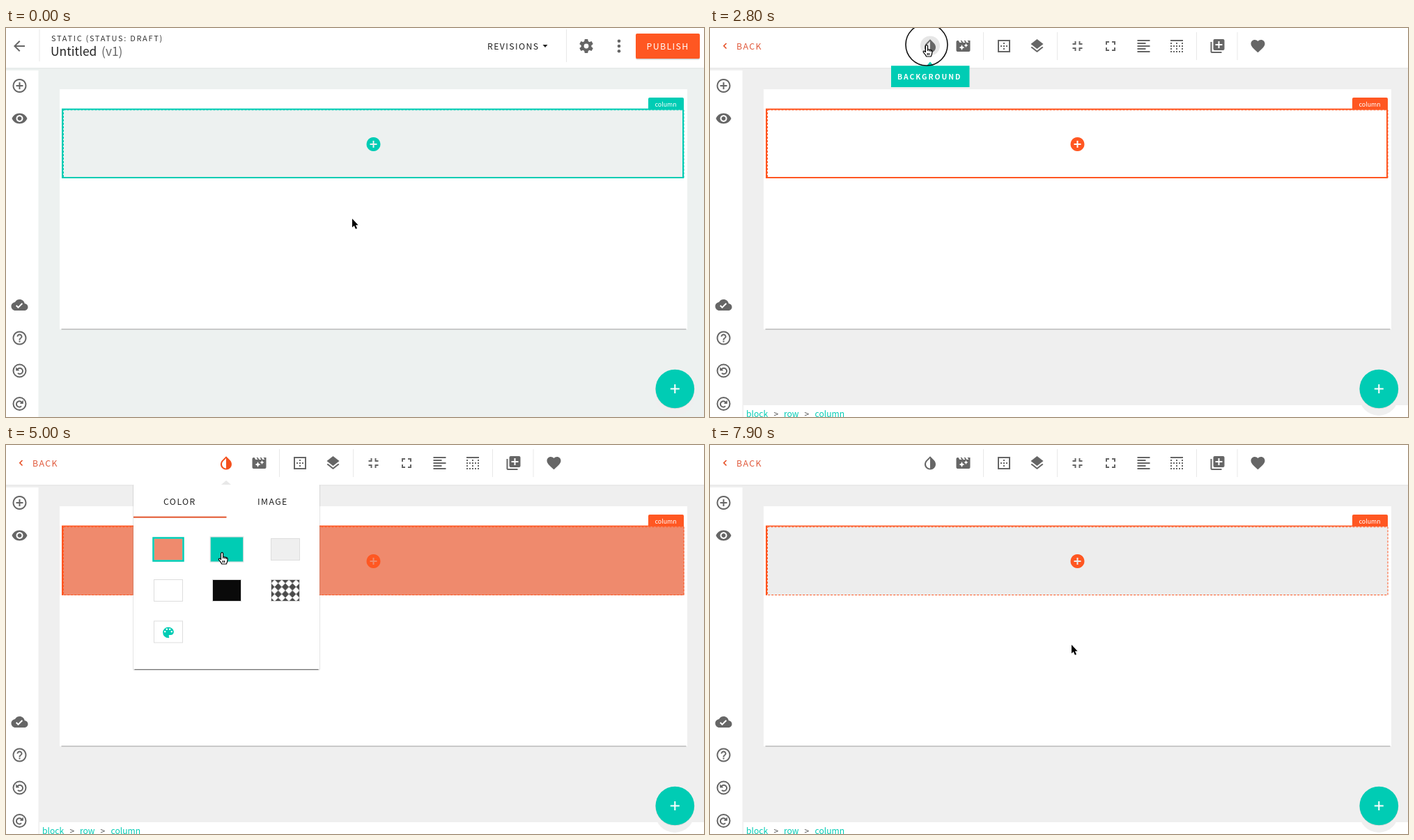
An HTML page for the animation above (8 s loop, 1002 px wide and 559 px high).

```html
<!DOCTYPE html>
<html lang="en">
<head>
<meta charset="utf-8">
<title>Column background editor</title>
<style>
  html, body { margin: 0; width: 100%; height: 100%; overflow: hidden; background: #fff; }
  svg { display: block; width: 100vw; height: 100vh; }
  text { font-family: "Noto Sans CJK JP", "Noto Sans CJK SC", "Noto Sans CJK", "Noto Sans", sans-serif; white-space: pre; }
  .caps { font-size: 12.3px; letter-spacing: 1.4px; fill: #222; }
  .icon { fill: #666; }
  .line { fill: none; stroke: #666; stroke-width: 2; }
  .rule { stroke: #e8e8e8; }
  .accent { fill: var(--accent); }
  .edge { fill: none; stroke: var(--accent); }
  .crumb { font-size: 12.1px; fill: #00ccb4; }
</style>
</head>
<body>
<svg id="stage" viewBox="0 0 1002 559"></svg>
<script>
const TEAL = '#00ccb4', ORANGE = '#ff5722', LOOP = 8000, STEP = 100;

const RING = 'M12 2a10 10 0 1 0 .01 0zM12 4a8 8 0 1 1-.01 0z';
const ICONS = {
  back: 'M20 11H7.83l5.59-5.59L12 4l-8 8 8 8 1.41-1.41L7.83 13H20z',
  add: RING + 'M13 7h-2v4H7v2h4v4h2v-4h4v-2h-4z',
  plusDisc: 'M12 2a10 10 0 1 0 .01 0zM13 7h-2v4H7v2h4v4h2v-4h4v-2h-4z',
  eye: 'M12 4.5C7 4.5 2.73 7.61 1 12c1.73 4.39 6 7.5 11 7.5s9.27-3.11 11-7.5c-1.73-4.39-6-7.5-11-7.5zM12 17a5 5 0 1 1 .01 0zM12 9a3 3 0 1 0 .01 0z',
  cloud: 'M19.35 10.04C18.67 6.59 15.64 4 12 4 9.11 4 6.6 5.64 5.35 8.04 2.34 8.36 0 10.91 0 14c0 3.31 2.69 6 6 6h13c2.76 0 5-2.24 5-5 0-2.64-2.05-4.78-4.65-4.96zM10 17l-3.5-3.5 1.41-1.41L10 14.17 15.18 9l1.41 1.41z',
  help: RING + 'M11 18h2v-2h-2zM12 6c-2.21 0-4 1.79-4 4h2c0-1.1.9-2 2-2s2 .9 2 2c0 2-3 1.75-3 5h2c0-2.25 3-2.5 3-5 0-2.21-1.79-4-4-4z',
  drop: 'M17.66 7.93L12 2.27 6.34 7.93c-3.12 3.12-3.12 8.19 0 11.31a8 8 0 0 0 11.32 0c3.12-3.12 3.12-8.19 0-11.31zM12 19.59c-1.6 0-3.11-.62-4.24-1.76a6 6 0 0 1 0-8.48L12 5.1z',
  movie: 'M18 4l2 3h-3l-2-3h-2l2 3h-3l-2-3H8l2 3H7L5 4H4c-1.1 0-2 .9-2 2v12c0 1.1.9 2 2 2h16c1.1 0 2-.9 2-2V4zM11.25 15.25L10 18l-1.25-2.75L6 14l2.75-1.25L10 10l1.25 2.75L14 14zM16.94 11.94L16 14l-.94-2.06L13 11l2.06-.94L16 8l.94 2.06L19 11z',
  border: 'M3 3v18h18V3zM19 19H5V5h14zM11 7h2v2h-2zM11 11h2v2h-2zM11 15h2v2h-2zM7 11h2v2H7zM15 11h2v2h-2z',
  layers: 'M12 18.54l-7.38-5.73L3 14.07l9 7 9-7-1.63-1.27zM12 16l7.36-5.73L21 9l-9-7-9 7 1.63 1.27z',
  shrink: 'M5 16h3v3h2v-5H5zM8 8H5v2h5V5H8zM14 19h2v-3h3v-2h-5zM16 8V5h-2v5h5V8z',
  expand: 'M7 14H5v5h5v-2H7zM5 10h2V7h3V5H5zM17 17h-3v2h5v-5h-2zM14 5v2h3v3h2V5z',
  align: 'M3 3h18v2H3zM3 7h12v2H3zM3 11h18v2H3zM3 15h12v2H3zM3 19h18v2H3z',
  copy: 'M4 6H2v14c0 1.1.9 2 2 2h14v-2H4zM20 2H8c-1.1 0-2 .9-2 2v12c0 1.1.9 2 2 2h12c1.1 0 2-.9 2-2V4c0-1.1-.9-2-2-2zM19 11h-4v4h-2v-4H9V9h4V5h2v4h4z',
  heart: 'M12 21.35l-1.45-1.32C5.4 15.36 2 12.28 2 8.5 2 5.42 4.42 3 7.5 3c1.74 0 3.41.81 4.5 2.09C13.09 3.81 14.76 3 16.5 3 19.58 3 22 5.42 22 8.5c0 3.78-3.4 6.86-8.55 11.54z',
  palette: 'M12 3a9 9 0 0 0 0 18c.83 0 1.5-.67 1.5-1.5 0-.39-.15-.74-.39-1.01-.23-.26-.38-.61-.38-.99 0-.83.67-1.5 1.5-1.5H16c2.76 0 5-2.24 5-5 0-4.42-4.03-8-9-8z'
    + [[6.5, 9], [9.5, 5], [14.5, 5], [17.5, 9]].map(([x, y]) => `M${x} ${y}a1.5 1.5 0 1 1-.01 0z`).join('')
};

const icon = (name, x, y, attrs = 'class="icon"', scale = 1) =>
  `<path ${attrs} fill-rule="evenodd" transform="translate(${x} ${y}) scale(${scale}) translate(-12 -12)" d="${ICONS[name]}"/>`;
const text = (x, y, str, attrs = 'class="caps"') => `<text x="${x}" y="${y}" ${attrs}>${str}</text>`;
const rect = (x, y, w, h, attrs) => `<rect x="${x}" y="${y}" width="${w}" height="${h}" ${attrs}/>`;
const rule = (x, y1, y2) => `<path class="rule" d="M${x} ${y1}V${y2}"/>`;

const turnArrow = (y, flip) => `<g transform="translate(19.5 ${y}) scale(${flip} 1)">
  <circle class="line" r="9"/>
  <path class="line" stroke-width="1.6" d="M-3.5-1.2A4.2 4.2 0 1 1-2.6 3.4"/>
  <path class="icon" d="M-5.3-5.2V0H-.2z"/></g>`;

const gear = `<g transform="translate(833 26)">
  <circle r="5.4" fill="none" stroke="#666" stroke-width="4"/>
  ${[0, 1, 2, 3, 4, 5].map(i => `<path class="icon" transform="rotate(${i * 60})" d="M-3-6L-2.2-10H2.2L3-6z"/>`).join('')}</g>`;

const sidebar = rect(0, 61, 46.5, 498, 'fill="#fff"')
  + icon('add', 19.5, 83) + icon('eye', 19.5, 130) + icon('cloud', 19.5, 398) + icon('help', 19.5, 445.5)
  + turnArrow(492.5, 1) + turnArrow(540, -1);

const pageHeader = `<g id="pageHeader">
  ${icon('back', 19, 26)}${rule(48, 2, 48)}${rule(804.5, 2, 49)}
  ${text(65, 19, 'STATIC (STATUS: DRAFT)', 'font-size="11" letter-spacing="1.68" fill="#333"')}
  ${text(64, 40, 'Untitled', 'font-size="17.4" fill="#222"')}
  ${text(137, 40, '(v1)', 'font-size="17.4" fill="#666"')}
  ${text(691, 31, 'REVISIONS')}
  <path d="M770.5 24H777.5L774 28z" fill="#222"/>
  ${gear}
  ${[18.7, 26, 33.3].map(y => `<circle class="icon" cx="880" cy="${y}" r="2.3"/>`).join('')}
  ${rect(904, 9.5, 92, 36, 'rx="2" fill="#000" opacity=".18"')}
  ${rect(904, 8, 92, 36, `rx="2" fill="${ORANGE}"`)}
  ${text(919.5, 31, 'PUBLISH', 'class="caps" style="fill:#fff"')}</g>`;

const toolbar = `<g id="toolbar">
  <path d="M23.5 22L19.8 25.8 23.5 29.6" fill="none" stroke="#e64a1f" stroke-width="1.5"/>
  ${text(38, 31, 'BACK', 'class="caps" style="fill:#e0583a"')}
  <circle id="dropHover" cx="316" cy="25.5" r="14" fill="#e6e6e6"/>
  ${icon('drop', 316, 26, 'id="drop"')}${icon('movie', 363.5, 26)}${rule(392.5, 6, 46)}
  ${icon('border', 422, 26)}${icon('layers', 469.5, 26)}${rule(498.5, 6, 46)}
  ${icon('shrink', 527.5, 26)}${icon('expand', 575, 26)}${icon('align', 622.5, 26)}
  <g transform="translate(658 14)" class="line"><path d="M3 4H21"/>
    <path stroke-dasharray="2 2" d="M3 12H21M3 20H21"/><path stroke-dasharray="2 6" d="M3 8H21M3 16H21"/></g>
  ${rule(698.5, 6, 46)}${icon('copy', 728.5, 26)}${rule(757, 6, 46)}${icon('heart', 786.5, 26)}
  ${rect(48, 542, 954, 17, 'fill="#fff"')}
  ${text(52, 559, 'block', 'class="crumb"')}${text(106, 559, 'row', 'class="crumb"')}${text(150.5, 559, 'column', 'class="crumb"')}
  ${[91.5, 135.5].map(x => text(x, 559, '&gt;', 'font-size="12.1" fill="#555"')).join('')}</g>`;

const page = rect(77, 88, 901, 345, 'fill="#fff"')
  + rect(79.5, 432.2, 897, 1.3, 'fill="#b2b2b2"')
  + `<g id="column">
  ${rect(81, 116.7, 891, 98.3, 'class="edge" stroke-width="2" id="under"')}
  ${rect(82, 117.3, 891.5, 98.7, 'id="fill"')}
  ${rect(82.5, 117.8, 890.5, 97.7, 'class="edge" stroke-dasharray="3 2"')}
  ${rect(81, 116.7, 891, 98.3, 'class="edge" stroke-width="2" id="over"')}
  <path class="accent" d="M922 117V102q0-2 2-2H971q2 0 2 2V117z"/>
  ${text(931.5, 112.7, 'column', 'font-size="8.9" fill="#fff"')}
  ${icon('plusDisc', 527.5, 167, 'class="accent"')}</g>`;

const fab = `<circle cx="960" cy="529" r="28" fill="#efefef"/>
  <circle cx="960.3" cy="519.3" r="28" fill="#000" opacity=".1"/>
  <circle cx="960.3" cy="518.5" r="27.8" fill="${TEAL}"/>
  <path d="M953.8 518.5H966.8M960.3 512V525" stroke="#fff" stroke-width="2"/>`;

const swatches = [
  [233, 150, '#ef8a6d'], [317, 150, TEAL], [401, 150, '#efefef'],
  [233, 209, '#fff'], [317, 209, '#0a0a0a'], [401, 209, 'url(#checker)'], [233, 268.5, '#fff']
];
const swatch = ([x, y, fill], i) => `<g id="swatch${i}" transform="translate(${x} ${y})">
  <g class="zoom">${rect(-20.5, -15.5, 41, 31, `fill="${fill}" stroke="#ddd"`)}</g>
  ${rect(-21.5, -16.5, 43, 33, `class="chosen" fill="none" stroke="${TEAL}" stroke-width="2.5"`)}</g>`;

const panel = `<g id="panel">
  <path d="M309 57L316 51 323 57z" fill="#e8e8e8"/>
  ${rect(182, 57, 269, 267, 'rx="2" fill="#000" opacity=".1"')}
  ${rect(184.5, 58, 264, 265.2, 'fill="#777"')}
  ${rect(183, 57, 267, 265, 'rx="1" fill="#fff"')}
  ${text(226, 86, 'COLOR')}${text(361, 86, 'IMAGE')}
  ${rect(183, 102.7, 133.5, 2, 'fill="#e2552d"')}
  ${swatches.map(swatch).join('')}
  ${icon('palette', 233, 269.5, `fill="${TEAL}"`, .87)}</g>`;

const tooltip = `<g id="tooltip">
  <path d="M260 54.3H311L316 48.5 321 54.3H372.5V85H260z" fill="${TEAL}"/>
  ${text(269, 74, 'BACKGROUND', 'font-size="10.4" font-weight="700" letter-spacing="1.95" fill="#fff"')}</g>`;

const pointer = `<g id="pointer">
  <circle id="click" r="30" cy="-.5" fill="none" stroke="#111" stroke-width="1.6"/>
  <path id="arrow" d="M0 0V12.6L2.8 10 4.9 14.8 7 13.9 5 9.2H8.6z" fill="#000" stroke="#fff" stroke-width="1.4" paint-order="stroke"/>
  <g id="hand" stroke="#000" stroke-width="1.2" stroke-linejoin="round">
    <path fill="#fff" d="M-1.6 1.2Q0-1.4 1.5 1.2V6L6 7Q8.2 7.5 8 10 7.8 13 6.2 16.5H-.4Q-1.6 13.6-4.6 10.6-5.4 8.5-3.5 8.5L-1.6 10z"/>
    <path fill="none" d="M1.5 5.6V8.6M3.8 6.5V9M6 7V9.4M1.2 11.6V14.4M3.4 11.6V14.4"/></g></g>`;

document.getElementById('stage').innerHTML = `
  <defs><pattern id="checker" x="-20.5" y="-15.5" width="10.25" height="10.4" patternUnits="userSpaceOnUse">
    <rect width="11" height="11" fill="#4a4a4a"/><path d="M5.1 0L10.2 5.2 5.1 10.4 0 5.2z" fill="#fff"/></pattern></defs>
  ${rect(0, 0, 1002, 559, 'id="backdrop"')}
  ${rect(0, 57, 1002, 2, 'fill="#000" opacity=".02"')}
  ${rect(0, 0, 1002, 57, 'fill="#fff"')}
  ${page}${pageHeader}${toolbar}${sidebar}${fab}${panel}${tooltip}${pointer}`;

// Pointer path: time, x, y
const path = [
  [0, 497, 274], [900, 937, 125], [1100, 937, 121], [1400, 936, 111], [2000, 936, 111],
  [2600, 311, 24.5], [3200, 311, 24.5], [4000, 234, 159], [4600, 234, 159],
  [5100, 319, 154], [5500, 319, 154], [5700, 368, 155], [6100, 402, 153], [6800, 402, 153],
  [7300, 519, 287], [LOOP, 519, 287]
];
const clicks = [[1600, 1900], [2700, 3000], [4200, 4500], [5200, 5500], [6200, 6500], [7400, 7600]];
const handTimes = [[1300, 2200], [2500, 3300], [3900, 4800], [5000, 5600], [5900, 6900]];
const hovers = [[0, 3800, 4900], [1, 4900, 5850], [2, 5800, 7000]];
// Selected swatch and resulting column fill, from each time on
const choices = [[0, 5, 'none'], [4400, 0, '#ef8a6d'], [5300, 1, TEAL], [6400, 2, '#ededed']];

const $ = id => document.getElementById(id);
const show = (el, on) => { el.style.display = on ? '' : 'none'; };
const during = (ranges, t) => ranges.some(([a, b]) => t >= a && t < b);
const clamp = v => Math.max(0, Math.min(1, v));
const ease = v => v * v * (3 - 2 * v);

function pointerAt(t) {
  const i = path.findIndex(p => p[0] > t);
  const [t0, x0, y0] = path[i - 1], [t1, x1, y1] = path[i];
  const k = ease((t - t0) / (t1 - t0));
  return [x0 + (x1 - x0) * k, y0 + (y1 - y0) * k];
}

function draw(t) {
  const selected = t >= 1900, open = t >= 3000 && t < 7600;
  const [x, y] = pointerAt(t);
  const [, chosen, paint] = choices.filter(c => c[0] <= t).pop();
  const filled = selected && paint !== 'none';
  const inColumn = y > 117 && y < 215 && x > 82 && x < 972;

  $('backdrop').setAttribute('fill', selected ? '#efefef' : '#edf1f0');
  show($('pageHeader'), !selected);
  show($('toolbar'), selected);
  $('column').style.setProperty('--accent', selected ? ORANGE : TEAL);
  $('fill').setAttribute('fill', selected ? paint : '#edf1f0');
  show($('under'), filled);
  show($('over'), !filled && (selected || !inColumn));

  show($('dropHover'), t >= 2600 && t < 3000);
  show($('tooltip'), t >= 2700 && t < 3000);
  $('drop').setAttribute('fill', open ? '#f4511e' : '#666');
  show($('panel'), open);
  $('panel').setAttribute('opacity', clamp((t - 2900) / 300));
  swatches.forEach((_, i) => {
    const hover = hovers.find(h => h[0] === i);
    const grow = hover ? clamp(Math.min(t - hover[1], hover[2] - t) / 150) : 0;
    const group = $('swatch' + i);
    group.querySelector('.zoom').setAttribute('transform', `scale(${1 + .24 * grow})`);
    show(group.querySelector('.chosen'), i === chosen);
  });

  const hand = during(handTimes, t);
  $('pointer').setAttribute('transform', `translate(${x} ${y})`);
  show($('hand'), hand);
  show($('arrow'), !hand);
  show($('click'), during(clicks, t));
}

function frame() {
  draw(Math.floor(performance.now() % LOOP / STEP) * STEP);
  requestAnimationFrame(frame);
}
frame();
</script>
</body>
</html>
```
